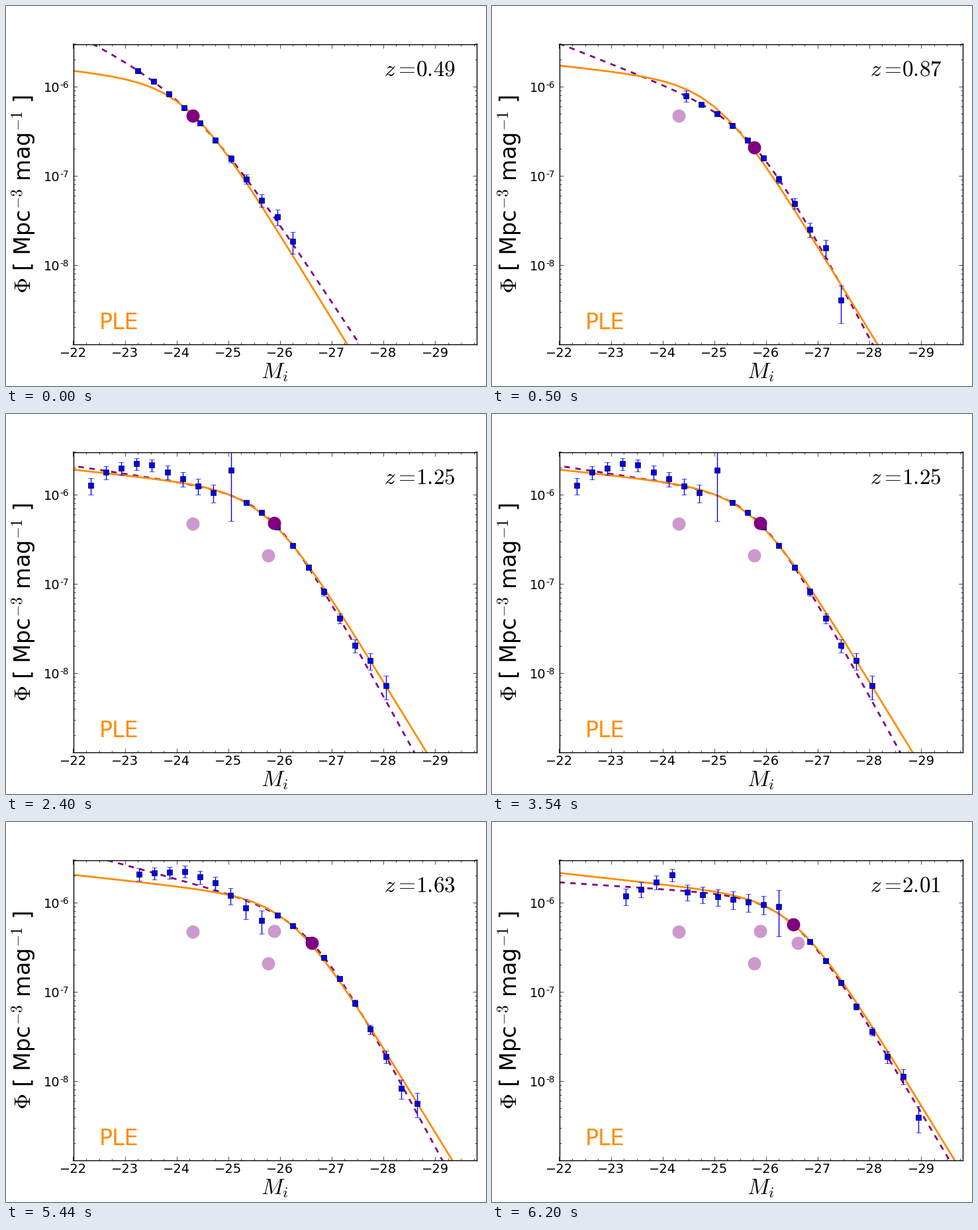
A matplotlib script that plays this animation: 725 by 575 pixels, repeating every 8 s.

```python
import numpy as np
import matplotlib.pyplot as plt
from matplotlib.animation import FuncAnimation
from matplotlib.ticker import MultipleLocator, NullFormatter

plt.style.use("classic")
plt.rcParams["font.family"] = "DejaVu Sans"

W, H, DPI = 725, 575, 100
STEP = 100                       # ms per frame
CHANGES = (500, 2400, 4300, 6200)
LOOP = 8000

# fit:   break magnitude, log density, faint and bright slope, first magnitude
# deep:  start and size of the faint sample, key points (index, log density)
# wide:  start and size of the bright sample, fractional error of its first bin
# tail:  log offset of the two brightest bins from the fit
EPOCHS = [
    dict(z=0.49, fit=(-24.312, -6.024, 0.683, 2.214, -22.37),
         wide=(23.25, 11, 0.02), tail=(0.06, 0.035)),
    dict(z=0.87, fit=(-25.778, -6.379, 0.571, 2.737, -22.0),
         wide=(24.45, 11, 0.14), tail=(0.10, -0.165)),
    dict(z=1.25, fit=(-25.881, -6.020, 0.220, 2.638, -22.1),
         deep=(22.34, 9, [(0, -5.90), (1, -5.75), (3.5, -5.63), (8, -5.98)]),
         wide=(25.05, 11, 0.73), tail=(0.14, 0.17)),
    dict(z=1.63, fit=(-26.611, -6.149, 0.395, 2.703, -22.66),
         deep=(23.27, 9, [(0, -5.68), (3, -5.65), (5, -5.78), (8, -6.20)]),
         wide=(25.95, 10, 0.03), tail=(-0.04, 0.11)),
    dict(z=2.01, fit=(-26.528, -5.946, 0.0955, 2.431, -22.0),
         deep=(23.29, 10, [(0, -5.93), (3, -5.69), (4, -5.88), (9, -6.02)]),
         wide=(26.25, 10, 0.53), tail=(0.07, -0.10)),
]

fig = plt.figure(figsize=(W / DPI, H / DPI), dpi=DPI, facecolor="white")
ax = fig.add_axes([0.14, 0.11, 0.84, 0.79])
ax.set_yscale("log")
ax.set_xlim(-22, -29.8)
ax.set_ylim(1.3e-9, 3e-6)
ax.xaxis.set_major_locator(MultipleLocator(1))
ax.xaxis.set_minor_locator(MultipleLocator(0.25))
ax.yaxis.set_major_formatter(NullFormatter())
ax.yaxis.set_minor_formatter(NullFormatter())
ax.tick_params(axis="x", labelsize=14, pad=3.2)


def label(x, y, text, size=24, **style):
    """Text with its baseline at a pixel position counted from the top left."""
    style = {"va": "baseline", **style}
    return fig.text(x / W, 1 - y / H, text, fontsize=size, **style)


def double_power_law(mag, m_star, log_phi, faint, bright):
    d = 0.4 * (m_star - mag)
    return 10 ** log_phi / (10 ** (faint * d) + 10 ** (bright * d))


def evolved_magnitude(z):
    return -22.843 - 2.5 * (1.241 * z - 0.249 * z ** 2)


def deep_sample(start, count, keys):
    index = np.arange(count)
    phi = 10 ** np.interp(index, *zip(*keys))
    return -start - 0.296 * index, phi, 0.23 * np.sqrt(1e-6 / phi)


def wide_sample(z, law, start, count, first_error, tail):
    """Bins along the fit with counting errors; a thin first bin lies high."""
    mags = -start - 0.3 * np.arange(count)
    offset = np.zeros(count)
    offset[0] = first_error ** 4
    offset[-2:] = tail
    phi = double_power_law(mags, *law) * 10 ** offset
    error = 0.275 * z ** -0.42 * np.sqrt(1e-8 / phi)
    error[0] = first_error
    return mags, phi, error


def draw_epoch(z, fit, wide, tail, deep=None):
    """Draw one redshift slice; return its artists and its break point marker."""
    *law, first = fit
    m_star, log_phi = law[:2]

    mags = np.linspace(first, -30, 300)
    dashed, = ax.plot(mags, double_power_law(mags, *law), "--",
                      color="purple", lw=2)
    mags = np.arange(-22, -30.6, -0.25)
    model = double_power_law(mags, evolved_magnitude(z), -5.96, 0.16, 2.37)
    solid, = ax.plot(mags, model, color="darkorange", lw=2)
    artists = [dashed, solid, label(570.7, 105, rf"$z=\!{z:.2f}$")]

    samples = [wide_sample(z, law, *wide, tail)]
    if deep:
        samples.append(deep_sample(*deep))
    for mags, phi, error in samples:
        bars = ax.errorbar(mags, phi, yerr=phi * error, fmt="s", color="b",
                           ecolor="b", mec="k", ms=6, capsize=3, zorder=3)
        artists += bars.get_children()

    knee, = ax.plot([m_star], [10 ** log_phi / 2], "o", color="purple",
                    ms=14.4, mew=0, zorder=5)
    return artists, knee


for power, y in ((6, 130), (7, 265), (8, 400)):
    label(81.6, y, "10", 14, ha="right")
    label(81.6, y - 6, f"-{power}", 9.8)
label(406, 563, "$M_i$", ha="center")
label(38, 284.6, r"$\Phi$ [ Mpc$^{-3}$ mag$^{-1}$ ]", ha="center",
      rotation=90, rotation_mode="anchor")
label(140.5, 489, "PLE", color="darkorange")

slices = [draw_epoch(**epoch) for epoch in EPOCHS]


def update(frame):
    current = sum(frame * STEP >= t for t in CHANGES)
    for i, (artists, knee) in enumerate(slices):
        for artist in artists:
            artist.set_visible(i == current)
        knee.set_visible(i <= current)
        knee.set_alpha(1 if i == current else 0.4)
    return []


anim = FuncAnimation(fig, update, frames=LOOP // STEP, interval=STEP,
                     init_func=lambda: update(0), repeat=True, repeat_delay=0)
plt.show()
```
